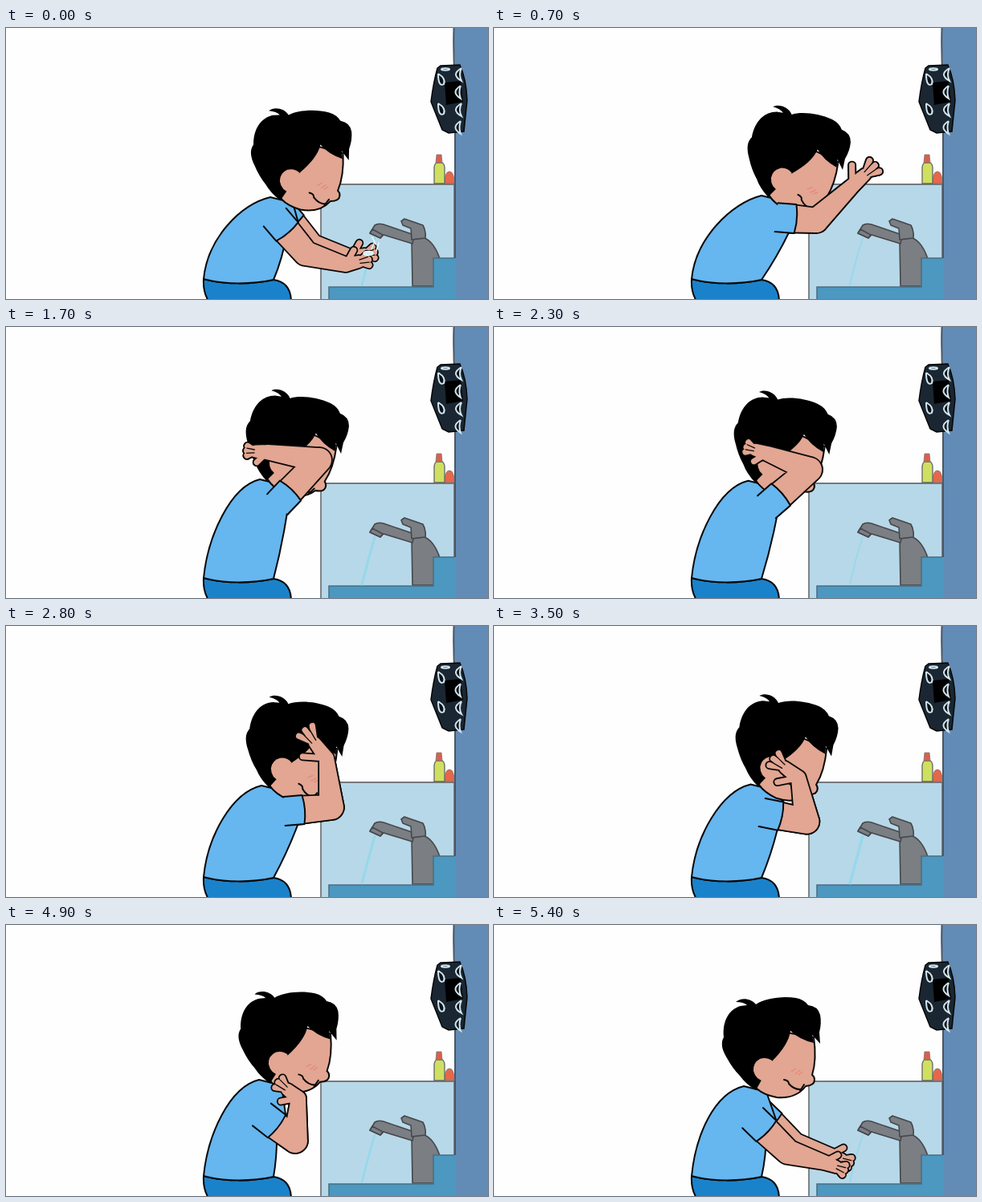
Recreate the animation shown at these times as an HTML page. Size 600 by 338 pixels, loop 6400 ms.

```html
<!DOCTYPE html>
<html lang="en">
<head>
<meta charset="utf-8">
<title>Washing up</title>
<style>
  html, body { margin: 0; width: 100%; height: 100%; overflow: hidden; background: #fefefe; }
  svg { display: block; width: 100vw; height: 100vh; }
  .ink { stroke: #080808; stroke-width: 2; stroke-linejoin: round; stroke-linecap: round; }
  .skin { fill: #e2a692; }
  .shirt { fill: #66b6ef; }
  .shorts { fill: #1a82ca; }
  .line { fill: none; }
  .metal { fill: #7b7e82; stroke: #45484c; stroke-width: 1.6; stroke-linejoin: round; }
  .print { fill: #0c1116; stroke: #d3e6f0; stroke-width: 2; }
  /* Outline first, so overlapping pieces merge into one silhouette. */
  #arm { paint-order: stroke; stroke-width: 3.6; }
</style>
</head>
<body>
<svg viewBox="0 0 600 338" preserveAspectRatio="none">
  <path d="M392 338V195H558V338" fill="#b7d8e8" stroke="#74797d" stroke-width="1.8"/>
  <path d="M557 0L559 62V338H600V0Z" fill="#628bb5"/>
  <path d="M557.5 0Q556.5 34 559 64V288" fill="none" stroke="#4b5663" stroke-width="2"/>
  <path d="M546 194Q546 179 552 179T558 194Z" fill="#e6674b" stroke="#777" stroke-width=".8"/>
  <path d="M533 194V175Q533 170 536 168H543Q546 170 546 175V194Z" fill="#cfe060" stroke="#666" stroke-width="1.3"/>
  <path d="M535 168L536 158H542L543 168Z" fill="#d9604b" stroke="#777" stroke-width=".8"/>
  <path class="metal" d="M505 264Q512 258 521 262Q533 267 540 288V322H506Z"/>
  <path class="metal" d="M453 256L459 246Q463 243 470 245L508 258L506 269L470 258L466 262Z"/>
  <path class="metal" d="M453 256L456 251L469 258L466 262Z"/>
  <path class="metal" d="M492 241L496 238L519 246Q523 253 522 262L505 264L504 250L494 246Z"/>
  <path d="M402 338V323H532V287H560V338Z" fill="#4c98c0"/>
  <path d="M402 338V323H532V287H558" fill="none" stroke="#4a6f83" stroke-width="1.6"/>
  <path d="M537 50L541 47L565 46Q573 64 574 90L570 129L551 131L543 127L529 92Q532 68 537 50Z" fill="#1a2733" stroke="#050505" stroke-width="1.5"/>
  <path d="M546 68L566 66L569 92L548 96Z" fill="#000"/>
  <g id="print" class="print"><ellipse cx="547" cy="51.5" rx="5" ry="1.2"/></g>

  <path id="stream" fill="none" stroke="#86d9ee" stroke-linecap="round" opacity=".65"/>
  <path id="shorts" class="ink shorts"/>
  <use id="farLimb" href="#limb"/>
  <path id="torso" class="ink shirt"/>
  <g id="head">
    <path class="ink skin" d="M324 185L327 204Q336 212 352 215Q376 217 388 201Q399 200 399 193Q399 189 396 187Q402 168 398 140L340 130Z"/>
    <path d="M301 96C307 90 320 91 326 99C336 92 358 88 376 91Q386 93 391 100Q403 101 406 112Q408 122 405 134L406 148L396 137L398 147Q380 143 369 132Q367 149 346 170L326 206Q313 198 306 188Q297 179 290 166Q280 150 286 140C284 119 293 105 307 101L315 100Q311 96 301 96Z"/>
    <path class="skin" d="M346 169Q339 164 331 167Q322 172 323 182Q326 194 338 195Q342 190 346 180Z"/>
    <path d="M370 183L376 179M375 186L381 181M379 187L384 183" stroke="#e88779" stroke-width="1.3"/>
    <path class="ink line" d="M361 193Q367 194 367 198Q374 206 383 205M386 199L381 207"/>
  </g>
  <g id="limb">
    <path id="arm" class="ink skin"/>
    <path id="creases" class="ink line" style="stroke-width:1.3"/>
    <path id="sleeve" class="ink shirt"/>
  </g>
  <g id="splash" fill="none" stroke="#e9fbff" stroke-width="1.4" stroke-linecap="round">
    <ellipse cx="451" cy="281" rx="6" ry="2.5" fill="#d4f1f8"/>
    <path d="M459 266L455 276M464 268L461 278M456 261L460 270"/>
  </g>
</svg>
<script>
const LOOP = 6400, STEP = 100, LAST_STEP = 5400;
const FAR_OFFSET = [7, -9];
const HIP = [246, 313], WAIST = [333, 314], KNEE = 355;
const RADIUS = { sleeve: 18, shoulder: 16.5, elbow: 15, wrist: 9, palm: 7.5, finger: 3.6 };

// Joints of each pose; "far" tells how much the second arm shows.
const poses = [
  // hands under the tap
  { time: [0, 0], ear: [352, 190], tilt: [5.5], shoulder: [350, 254], elbow: [373, 281], wrist: [423, 295], tip: [455, 288], far: [1] },
  // arm raised to the face
  { time: [700, 700], ear: [356, 188], tilt: [16], shoulder: [375, 238], elbow: [401, 240], wrist: [446, 197], tip: [477, 169], far: [0] },
  // forearm across the head
  { time: [1500, 2100], ear: [339, 169], tilt: [16], shoulder: [354, 204], elbow: [390, 166], wrist: [325, 156], tip: [296, 154], far: [0] },
  // palm on the forehead
  { time: [2800, 2900], ear: [341, 178], tilt: [13], shoulder: [370, 229], elbow: [405, 226], wrist: [399, 165], tip: [370, 127], far: [0] },
  // fingers at the ear
  { time: [3800, 4200], ear: [343, 176], tilt: [14], shoulder: [352, 240], elbow: [384, 250], wrist: [372, 198], tip: [336, 176], far: [0] },
  // hand on the neck
  { time: [4800, 4900], ear: [338, 172], tilt: [3], shoulder: [337, 251], elbow: [360, 269], wrist: [364, 216], tip: [336, 194], far: [0] },
  // arms lowered
  { time: [5400, 6400], ear: [334, 180], tilt: [0], shoulder: [339, 257], elbow: [366, 283], wrist: [411, 296], tip: [440, 307], far: [1] }
];

const el = id => document.getElementById(id);
const set = (id, name, value) => el(id).setAttribute(name, value);
const draw = (id, d) => set(id, 'd', d);
const mix = (a, b, k) => a.map((v, i) => v + (b[i] - v) * k);
const move = ([x, y], dx, dy) => [x + dx, y + dy];
const along = ([x, y], angle, length) => [x + Math.cos(angle) * length, y + Math.sin(angle) * length];
const heading = (a, b) => Math.atan2(b[1] - a[1], b[0] - a[0]);
const distance = (a, b) => Math.hypot(b[0] - a[0], b[1] - a[1]);

// Tapered piece with round ends.
function capsule(a, ra, b, rb) {
  const side = heading(a, b) + Math.PI / 2;
  return `M${along(a, side, ra)}A${ra} ${ra} 0 0 1 ${along(a, side, -ra)}` +
    `L${along(b, side, -rb)}A${rb} ${rb} 0 0 1 ${along(b, side, rb)}Z`;
}

function poseAt(t) {
  const next = poses.findIndex(p => t <= p.time[1]);
  const to = poses[next], from = poses[Math.max(0, next - 1)];
  const start = from.time[1], span = to.time[0] - start;
  const raw = span > 0 ? Math.min(1, (t - start) / span) : 1;
  const k = raw * raw * (3 - 2 * raw);
  return Object.fromEntries(Object.keys(to).map(key => [key, mix(from[key], to[key], k)]));
}

function drawHead({ ear, tilt }) {
  set('head', 'transform', `translate(${ear}) rotate(${tilt}) translate(-334 -180)`);
}

function drawBody({ ear, shoulder, elbow }) {
  const nape = move(ear, -23, 21), throat = move(ear, 5, 28);
  const seam = along(shoulder, heading(shoulder, elbow) - Math.PI / 2, RADIUS.sleeve);
  const belt = `C${move(HIP, 26, 7)} ${move(WAIST, -28, 6)} ${WAIST}`;
  const chest = move(mix(WAIST, shoulder, 0.5), 3, 3);
  draw('torso', `M${nape}C${move(nape, -37, 9)} 251 262 ${HIP}${belt}Q${chest} ${shoulder}L${seam}L${throat}Z`);
  draw('shorts', `M${HIP}${belt}C${KNEE - 8} 316 ${KNEE} 325 ${KNEE} 342H253Q245 330 ${HIP}Z`);
}

function drawLimb({ shoulder, elbow, wrist, tip, far }) {
  const reach = heading(wrist, tip), length = distance(wrist, tip);
  const palm = along(wrist, reach, length * 0.5);
  const finger = spread => along(wrist, reach + spread, length - RADIUS.finger);
  const fingers = [-0.24, 0, 0.24].map(finger);
  const thumb = along(wrist, reach - 0.85, length * 0.62);
  draw('arm',
    capsule(shoulder, RADIUS.shoulder, elbow, RADIUS.elbow) +
    capsule(elbow, RADIUS.elbow, wrist, RADIUS.wrist) +
    capsule(wrist, RADIUS.wrist, palm, RADIUS.palm) +
    capsule(wrist, RADIUS.finger, thumb, RADIUS.finger) +
    fingers.map(f => capsule(palm, RADIUS.finger, f, RADIUS.finger)).join(''));
  draw('creases', [-0.12, 0.12].map(s => `M${along(wrist, reach + s, length * 0.55)}L${finger(s)}`).join(''));

  const out = heading(shoulder, elbow), side = out - Math.PI / 2;
  const top = along(shoulder, side, RADIUS.sleeve), bottom = along(shoulder, side, -RADIUS.sleeve);
  draw('sleeve', `M${along(top, out, -23)}L${top}Q${along(shoulder, out, 4)} ${bottom}L${along(bottom, out, -24)}`);
  set('farLimb', 'transform', `translate(${FAR_OFFSET.map(v => v * far[0])})`);
}

function drawWater(t) {
  const sway = Math.sin(t / 130);
  draw('stream', `M459 262Q${452 + sway} 285 443 321`);
  set('stream', 'stroke-width', 2.6 + sway);
  set('splash', 'opacity', Math.max(0, 1 - t / 300));
}

function drawPrint() {
  let marks = '';
  for (let i = 0; i < 4; i++) {
    const y = 58 + i * 22;
    marks += `M${567 - i % 2} ${y - 8}Q553 ${y} ${567 - i % 2} ${y + 8}Q563 ${y} ${567 - i % 2} ${y - 8}`;
  }
  for (const y of [65, 102]) marks += `M538 ${y - 8}Q548 ${y - 2} 545 ${y + 5}Q538 ${y + 9} 538 ${y - 8}`;
  el('print').innerHTML += `<path d="${marks}"/>`;
}

function tick() {
  const t = Math.min(LAST_STEP, Math.floor(performance.now() % LOOP / STEP) * STEP);
  const pose = poseAt(t);
  drawHead(pose);
  drawBody(pose);
  drawLimb(pose);
  drawWater(t);
  requestAnimationFrame(tick);
}

drawPrint();
tick();
</script>
</body>
</html>
```
